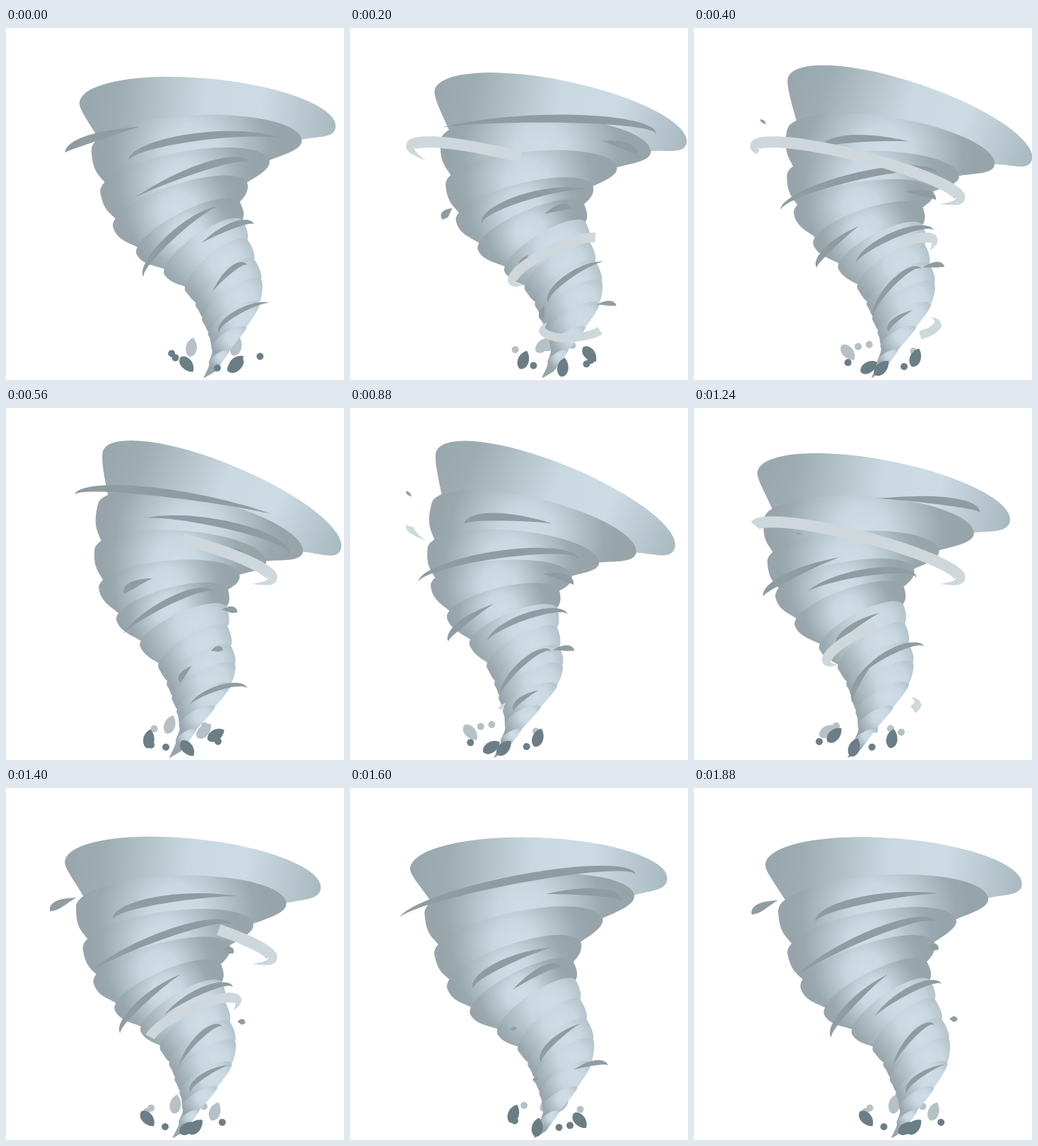
Write an HTML page with a canvas that moves like this. It is 478 px wide and 498 px high and loops after 1920 ms.

```html
<!DOCTYPE html>
<html lang="en">
<head>
<meta charset="utf-8">
<title>Tornado</title>
<style>
  html, body { margin: 0; width: 100%; height: 100%; overflow: hidden; background: #fff; }
  canvas { display: block; }
</style>
</head>
<body>
<canvas id="stage" width="478" height="498"></canvas>
<script>
const ctx = document.getElementById('stage').getContext('2d');
const LOOP = 1920, BEAT = 480, STEP = 40, LAYERS = 12, TURN = 2 * Math.PI;
const DARK = '#6b7e86', LIGHT = '#b5c1c6', WIND = '#8f9da2', RING = '#ced8dc';

// Funnel outline: one key for every third layer, from the rim to the tip
const funnel = {
  x: [285, 229, 270, 288, 249],
  y: [126, 248, 338, 412, 491],
  size: [5.204, 4.605, 4.043, 3.761, 2.3],
  tilt: [13, -11.5, -35, -30, -32]
};

// Start time of the dark gust on each level
const leftGusts = { 0: 390, 2: 160, 4: 280, 7: 140 };
const rightGusts = { 1: 275, 3: 0, 5: 140, 7: 0, 9: 280 };

// Pale rings sweep round twice in each loop
const rings = [
  { x: 231, y: 205, rx: 150, ry: 24, tilt: .25, sway: 0, width: 16, starts: [20, 830], time: 710 },
  { x: 269, y: 330, rx: 69, ry: 18, tilt: -.44, sway: 30, width: 14, starts: [16, 1108], time: 480 },
  { x: 291, y: 422, rx: 45, ry: -16, tilt: -.1, sway: 33, width: 12, starts: [40, 850], time: 450 }
];

const wrap = (n, m) => ((n % m) + m) % m;
const clamp = n => Math.min(1, Math.max(0, n));
const mix = (a, b, k) => a + (b - a) * k;
const wave = (t, peak) => Math.cos((t - peak) / LOOP * TURN);
const random = n => wrap(Math.sin(n * 127.1 + 3) * 43758.5, 1);

// Smooth curve through the keys, extended in a straight line at both ends
function curve(keys, level) {
  const n = keys.length - 1, pos = level / 3, i = Math.min(n - 1, Math.floor(pos)), f = pos - i;
  const key = k => k < 0 ? 2 * keys[0] - keys[1] : k > n ? 2 * keys[n] - keys[n - 1] : keys[k];
  const [a, b, c, d] = [key(i - 1), key(i), key(i + 1), key(i + 2)];
  return b + f * (c - a + f * (2 * a - 5 * b + 4 * c - d + f * (3 * (b - c) + d - a))) / 2;
}

// The rim sways a quarter turn behind the tip, and the tilt follows later
function pose(i, t) {
  const lean = wave(t, Math.min(800, 710 + 22 * i));
  return {
    h: Math.exp(curve(funnel.size, i)),
    x: curve(funnel.x, i) + 45 * (1 - .85 ** i) * wave(t, 0) + 21 * .68 ** i * wave(t, BEAT),
    y: curve(funnel.y, i) + 5 * Math.cos(.9 * i) * .9 ** i * lean,
    a: (curve(funnel.tilt, i) + (11 - .9 * i) * lean) * Math.PI / 180
  };
}

// Point of a layer in units of its half length
function at(p, u, v) {
  const c = Math.cos(p.a) * p.h, s = Math.sin(p.a) * p.h;
  return [p.x + u * c - v * s, p.y + u * s + v * c];
}

function shade(p, i) {
  const low = i > 4, mid = at(p, low ? .25 : -.05, .06);
  const stops = i
    ? [[0, '#cfdde6'], [.3, '#c9d7e0'], [.85, '#9aa9af'], [1, '#97a5ab']]
    : [[0, '#98a7ad'], [.15, '#9eadb3'], [.48, '#cad8e1'], [.7, '#cddbe4'], [1, '#a9b9c0']];
  const g = i
    ? ctx.createRadialGradient(...mid, 0, ...mid, p.h * (low ? 1.35 : .87))
    : ctx.createLinearGradient(...at(p, -1, 0), ...at(p, 1, 0));
  stops.forEach(s => g.addColorStop(...s));
  return g;
}

// Elliptical top edge, then the body tucks in behind the next layer
function drawLayer(i, t) {
  const p = pose(i, t), q = pose(i + 1, t);
  ctx.beginPath();
  ctx.ellipse(p.x, p.y, p.h, p.h * (.28 + .006 * i), p.a, Math.PI, TURN);
  ctx.bezierCurveTo(...at(p, 1, .1), ...at(q, 1.12, -.04), ...at(q, .97, 0));
  ctx.lineTo(...at(q, -.9, -.05));
  ctx.bezierCurveTo(...at(q, -.98, -.22), ...at(p, -1, i ? .22 : .06), ...at(p, -1, 0));
  ctx.fillStyle = shade(p, i);
  ctx.fill();
}

// Fills a band of varying width along a path between s0 and s1
function ribbon(path, s0, s1, width, color) {
  if (s1 - s0 < .01) return;
  const n = 48, upper = [], lower = [];
  for (let k = 0; k <= n; k++) {
    const s = mix(s0, s1, k / n), [x, y] = path(s);
    const [xa, ya] = path(s - .004), [xb, yb] = path(s + .004);
    const w = width(s, k / n) / 2 / Math.hypot(xb - xa, yb - ya);
    upper.push([x + (yb - ya) * w, y - (xb - xa) * w]);
    lower.unshift([x - (yb - ya) * w, y + (xb - xa) * w]);
  }
  ctx.beginPath();
  upper.concat(lower).forEach(pt => ctx.lineTo(...pt));
  ctx.fillStyle = color;
  ctx.fill();
}

// The head runs along the path first, then the tail catches up
function sweep(path, u, width, color) {
  if (u > 0 && u < 1) ribbon(path, clamp(2 * u - 1), clamp(2 * u), width, color);
}

function drawGust(level, start, right, t) {
  const p = pose(level, t), sag = .14 + .025 * level;
  const [u0, v0, u1, v1] = right
    ? [-.65, .12, .8 + .07 * level, .04 * level]
    : [-1.07, .4, .75, -.02];
  const path = s => {
    const k = (1 - Math.cos(Math.PI * s)) / 2;
    return at(p, mix(u0, u1, k), mix(v0, v1, k) - sag * Math.sin(Math.PI * s));
  };
  const thick = 11.5 - .5 * level;
  sweep(path, wrap(t - start, BEAT) / BEAT, (s, k) => thick * Math.sin(Math.PI * k), WIND);
}

function drawRing({ x, y, rx, ry, tilt, sway, width, starts, time }, t) {
  const p = { x: x + sway * wave(t, 0), y, h: rx, a: tilt };
  const path = s => {
    const angle = mix(Math.PI - .6, TURN + .6, s);
    return at(p, Math.cos(angle), Math.sin(angle) * ry / rx);
  };
  for (const start of starts)
    sweep(path, (t - start) / time, s => width * clamp(Math.min(s, 1 - s) * 6), RING);
}

// Leaves and pebbles circle the tip: pale behind the funnel, dark in front
function drawDebris(t, front) {
  const tip = pose(LAYERS, t).x + 8;
  ctx.fillStyle = front ? DARK : LIGHT;
  for (let k = 0; k < 10; k++) {
    const angle = k * 2.4 + .6 - t / BEAT * TURN, depth = Math.sin(angle);
    if (depth > -.3 !== front) continue;
    ctx.save();
    ctx.translate(tip + (28 + 38 * random(k)) * Math.cos(angle), 464 + 17 * depth);
    ctx.rotate(random(k + 20) * TURN);
    ctx.beginPath();
    if (k % 2) {
      ctx.arc(0, 0, 5, 0, TURN);
    } else {
      ctx.moveTo(14, 3);
      ctx.bezierCurveTo(4, 12, -13, 9, -13, -2);
      ctx.bezierCurveTo(-9, -10, 8, -10, 14, 3);
    }
    ctx.fill();
    ctx.restore();
  }
}

function draw(t) {
  ctx.fillStyle = '#fff';
  ctx.fillRect(0, 0, 478, 498);
  drawDebris(t, false);
  for (let i = 0; i < LAYERS; i++) drawLayer(i, t);
  for (const level in leftGusts) drawGust(+level, leftGusts[level], false, t);
  for (const level in rightGusts) drawGust(+level, rightGusts[level], true, t);
  rings.forEach(ring => drawRing(ring, t));
  drawDebris(t, true);
}

const begin = performance.now();
function tick() {
  const t = wrap(performance.now() - begin, LOOP);
  draw(Math.floor(t / STEP) * STEP);
  requestAnimationFrame(tick);
}
tick();
</script>
</body>
</html>
```
